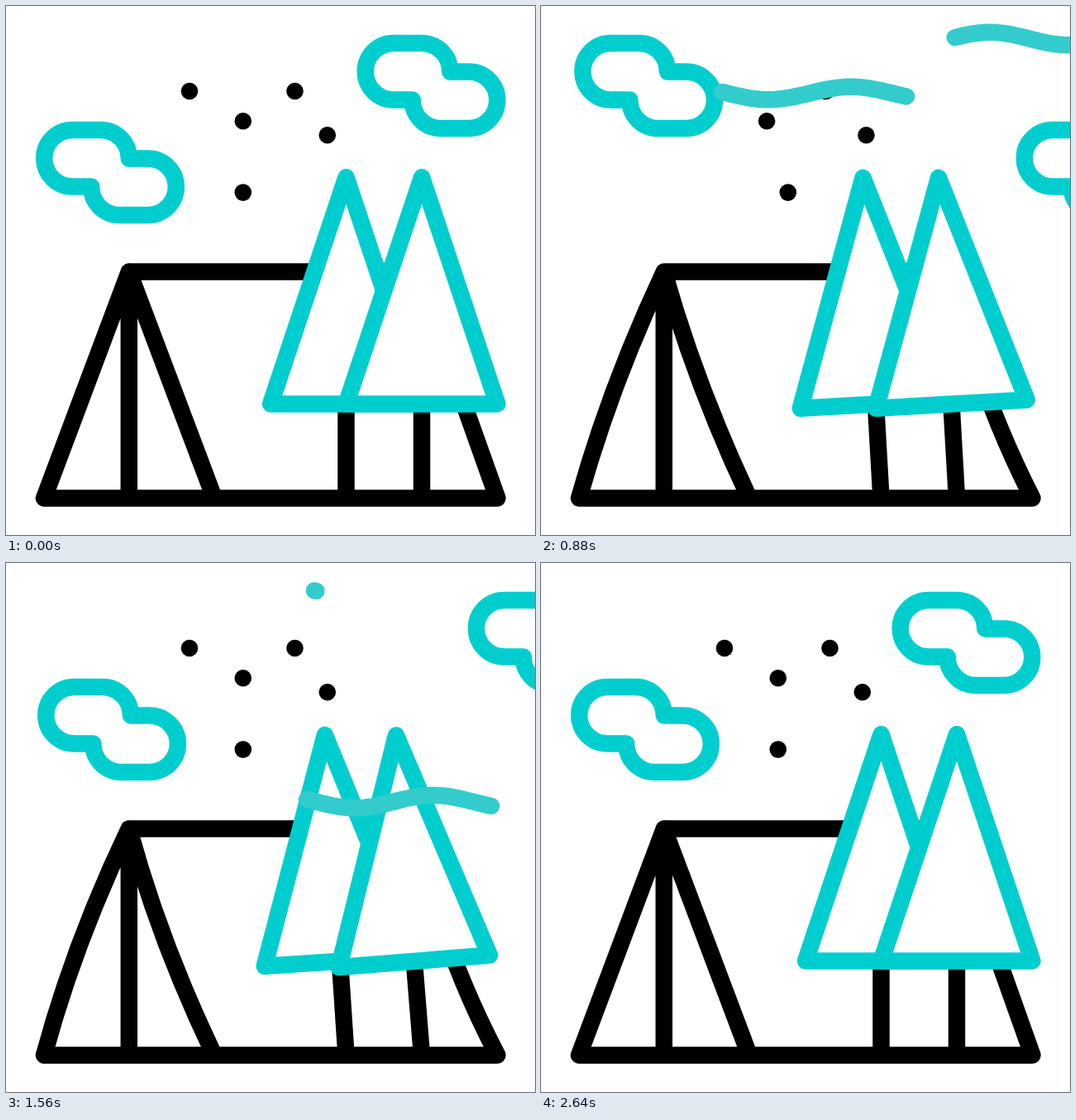
Animation of 640 by 640 pixels, one loop 3200 ms. Source, as an HTML page:

```html
<!DOCTYPE html>
<html lang="en">
<head>
<meta charset="utf-8">
<title>Windy camp</title>
<style>
  html, body { margin: 0; width: 100%; height: 100%; overflow: hidden; background: #fff; }
  svg { display: block; width: 100vw; height: 100vh; }
  .line { fill: none; stroke-width: 20.5; stroke-linecap: round; stroke-linejoin: round; }
  .ink { stroke: #000; }
  .teal { stroke: #00cece; fill: #fff; }
  .wind { stroke: #3cc; }
  .trunk { stroke-linecap: butt; }
</style>
</head>
<body>
<svg viewBox="0 0 640 640">
  <defs>
    <path id="cloud" class="line teal" d="M469 45H503A34.3 34.3 0 0 1 537.3 79.4H560A34.3 34.3 0 0 1 560 148H526A34.3 34.3 0 0 1 491.7 113.6H469A34.3 34.3 0 0 1 469 45Z"/>
    <g id="tree">
      <path class="line ink trunk" d="M0 -114V0"/>
      <path class="line teal" d="M0 -388.5L91.4 -114.3H-91.4Z"/>
    </g>
  </defs>
  <g id="dots"></g>
  <use id="cloudA" href="#cloud"/>
  <use id="cloudB" href="#cloud"/>
  <path id="tent" class="line ink"/>
  <use id="backTree" href="#tree"/>
  <use id="frontTree" href="#tree"/>
  <g id="winds"></g>
</svg>
<script>
const LOOP = 3200, STEP = 40;
const $ = id => document.getElementById(id);

function add(parent, tag, attrs) {
  const el = document.createElementNS('http://www.w3.org/2000/svg', tag);
  for (const k in attrs) el.setAttribute(k, attrs[k]);
  return parent.appendChild(el);
}

// Eased progress from 0 to 1 between times a and b
function ease(t, a, b) {
  const s = Math.min(1, Math.max(0, (t - a) / (b - a)));
  return s * s * (3 - 2 * s);
}

// Eased track through [time, value] keys
function track(t, keys) {
  let v = keys[0][1];
  for (let i = 1; i < keys.length; i++) {
    const [a, from] = keys[i - 1], [b, to] = keys[i];
    if (t >= a) v = from + (to - from) * ease(t, a, b);
  }
  return v;
}

const dots = [
  { x: 222, y: 103, start: 510 },
  { x: 349.5, y: 103, start: 400 },
  { x: 286.8, y: 139.3, start: 457 },
  { x: 388.8, y: 156.2, start: 336 },
  { x: 286.8, y: 225.6, start: 240 }
];
for (const d of dots) d.el = add($('dots'), 'circle', { cx: d.x, cy: d.y, r: 10.3 });

const winds = [
  { left: 252, y: 105.5, trough: 330, period: 200, start: 200, drift: 0.0625 },
  { left: 373, y: 39.5, trough: 448, period: 190, start: 400, drift: 0 },
  { left: 342, y: 288.7, trough: 612, period: 190, start: 880, drift: 0 }
];
for (const w of winds) w.el = add($('winds'), 'path', { class: 'line wind' });

const frontKeys = [[140, 0], [628, 5.6], [880, 3.25], [1280, 3.25], [1850, 6], [2230, 6], [2640, 0]];
const backKeys = [[250, 0], [700, 5], [880, 3.25], [1280, 3.25], [2210, 5.75], [2230, 5.75], [2640, 0]];
const bendKeys = [[690, 0], [880, 1], [1280, 1], [1850, 1.2], [2230, 1.2], [2640, 0]];

function drawWind(w, t) {
  const span = 363, shift = w.drift * t;
  const right = w.left + span - shift;
  const head = right - span * ease(t, w.start, w.start + 800);
  const tail = right - span * ease(t, w.start + 360, w.start + 1200);
  if (tail - head < 0.5) return w.el.setAttribute('d', '');
  const n = Math.ceil((tail - head) / 5), pts = [];
  for (let i = 0; i <= n; i++) {
    const x = head + (tail - head) * i / n;
    const y = w.y + 7.7 * Math.cos(2 * Math.PI * (x - w.trough + shift) / w.period);
    pts.push(x.toFixed(2) + ' ' + y.toFixed(2));
  }
  w.el.setAttribute('d', 'M' + pts.join('L'));
}

function drawTent(bend) {
  const b = 13 * bend;
  $('tent').setAttribute('d',
    `M148.8 321.5Q${97.4 - b} 458.5 46 595.5H594.5` +
    `Q${545.8 - 1.6 * b} 458.5 497 321.5H148.8V595.5` +
    `M148.8 321.5Q${200.4 - b} 458.5 252 595.5`);
}

function cloudAX(t) {
  const p = ease(t, 165, 1597);
  return 1075 * (p < 0.4 ? -p : 1 - p);
}

function cloudBX(t) {
  if (t < 1250) return -0.000885 * Math.max(0, t - 221) ** 2;
  return 0.00081 * Math.max(0, 1967 - t) ** 2;
}

function draw(t) {
  for (const d of dots) {
    const s = d.start;
    const dx = track(t, [[s, 0], [s + 320, -22], [s + 640, 12], [s + 990, 0]]);
    d.el.setAttribute('cx', d.x + dx);
  }
  $('cloudA').setAttribute('transform', `translate(${cloudAX(t) - 388.5} 105)`);
  $('cloudB').setAttribute('transform', `translate(${cloudBX(t)} 0)`);
  drawTent(track(t, bendKeys));
  $('backTree').setAttribute('transform', `translate(411.5 595.7) rotate(${-track(t, backKeys)})`);
  $('frontTree').setAttribute('transform', `translate(503 595.7) rotate(${-track(t, frontKeys)})`);
  for (const w of winds) drawWind(w, t);
}

const begin = performance.now();
function tick() {
  const t = (performance.now() - begin) % LOOP;
  draw(Math.floor(t / STEP) * STEP);
  requestAnimationFrame(tick);
}
tick();
</script>
</body>
</html>
```
